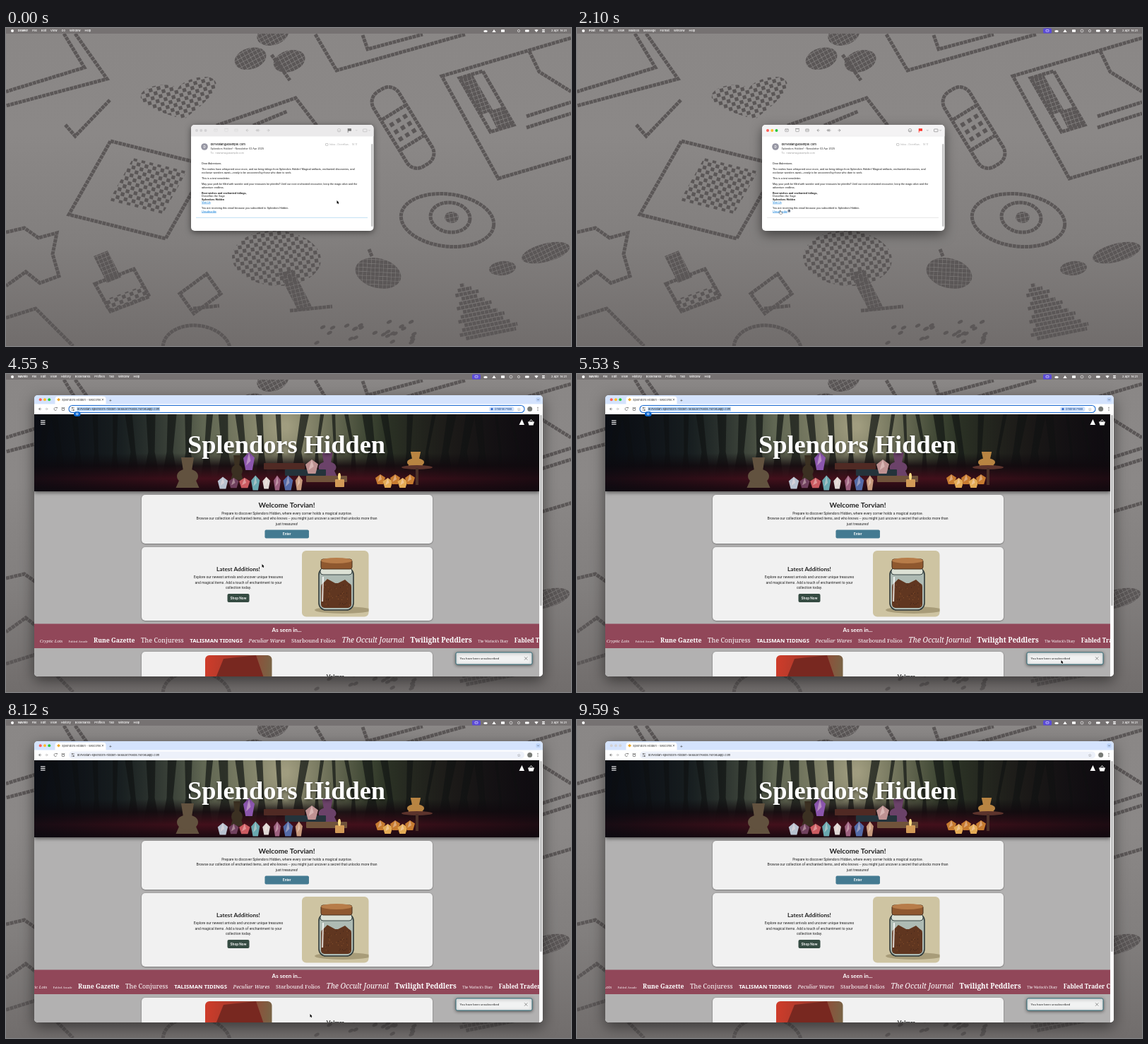
An HTML page with a canvas for the animation above (9.66 s loop, 800x450 px).

```html
<!DOCTYPE html>
<html lang="en">
<head>
<meta charset="utf-8">
<title>Unsubscribe demo</title>
<style>
html, body { margin: 0; width: 100%; height: 100%; overflow: hidden; background: #807c7b; }
canvas { display: block; }
</style>
</head>
<body>
<canvas id="stage" width="800" height="450"></canvas>
<script>
const LOOP = 9660, STEP = 70;
const RECORD = 350, ACTIVE = 700, HOVER = 1820, BROWSER = 2800, LOADED = 4480, BLUR = 6500, END = 9450;
const SHOP = 'Splendors Hidden';
const HOST = 'dorvellian-splendors-hidden-568a3e176ede.herokuapp.com';
const UI = 'Inter, sans-serif', BODY = 'Roboto, sans-serif', HEAD = 'Lato, sans-serif';
const ARIAL = '"Liberation Sans", Arial, sans-serif', SANS = '"Noto Sans", sans-serif';
const SERIF = '"Noto Serif", serif', NARROW = '"Liberation Serif", serif';
const stage = document.getElementById('stage').getContext('2d');
let c = stage;

function text(s, x, y, font, color = '#111', align = 'left') {
  c.font = font; c.fillStyle = color; c.textAlign = align;
  c.fillText(s, x, y);
  return c.measureText(s).width;
}
function paint(fill, stroke, width = 0.6) {
  if (fill) { c.fillStyle = fill; c.fill(); }
  if (stroke) { c.strokeStyle = stroke; c.lineWidth = width; c.stroke(); }
}
function box(x, y, w, h, r, fill, stroke, width) {
  c.beginPath(); c.roundRect(x, y, w, h, r); paint(fill, stroke, width);
}
function trace(points, closed) {
  c.beginPath();
  for (let i = 0; i < points.length; i += 2) c.lineTo(points[i], points[i + 1]);
  if (closed) c.closePath();
}
function line(points, color, width) { trace(points); paint(null, color, width); }
function poly(points, color) { trace(points, true); paint(color); }
function oval(x, y, rx, ry, color, angle = 0) {
  c.beginPath(); c.ellipse(x, y, rx, ry, angle, 0, 7); paint(color);
}
function dot(x, y, r, color) { oval(x, y, r, r, color); }
function arc(x, y, r, color, from = 0, to = 7) {
  c.beginPath(); c.arc(x, y, r, from, to); paint(null, color);
}
function cross(x, y, r, color) {
  line([x - r, y - r, x + r, y + r], color); line([x + r, y - r, x - r, y + r], color);
}
function chevron(x, y, r, color) { line([x - r, y - r / 2, x, y + r / 2, x + r, y - r / 2], color); }
function arrow(x, y, dir, color) {
  line([x, y - 2, x + 2 * dir, y, x, y + 2], color); line([x + 2 * dir, y, x - 1.5 * dir, y], color);
}
function gradient(x0, y0, x1, y1, ...colors) {
  const g = c.createLinearGradient(x0, y0, x1, y1);
  colors.forEach((color, i) => g.addColorStop(i / (colors.length - 1), color));
  return g;
}
function shadowed(blur, dy, draw) {
  c.save();
  c.shadowColor = 'rgba(0,0,0,.5)'; c.shadowBlur = blur; c.shadowOffsetY = dy;
  draw();
  c.restore();
}
function cached(draw) {
  const layer = document.createElement('canvas');
  layer.width = 800; layer.height = 450;
  c = layer.getContext('2d');
  draw();
  c = stage;
  return layer;
}
let seed = 7;
const random = () => (seed = seed * 16807 % 2147483647) / 2147483647;
const range = (n, f) => Array.from({ length: n }, (_, i) => f(i));

// Wallpaper: doodles laid out of small dark tiles
const TILE = '#5b5757';
function tiled() {
  c.setLineDash([5, 0.8]); paint(null, TILE, 5); c.setLineDash([]);
}
function row(...points) { trace(points); tiled(); }
function ring(x, y, rx, ry) {
  c.beginPath(); c.ellipse(x, y, rx, ry, .12, 0, 7); tiled();
}
// Corner and two edge vectors
const corners = (x, y, ax, ay, bx, by) => [x, y, x + ax, y + ay, x + ax + bx, y + ay + by, x + bx, y + by];
function frame(...quad) { trace(corners(...quad), true); tiled(); }
function mosaic(angle, checker) {
  c.save();
  c.clip(); c.rotate(angle);
  c.fillStyle = TILE;
  for (let i = -90; i < 170; i++) for (let j = -90; j < 130; j++)
    if (!checker || (i + j) % 2) c.fillRect(i * 5.8, j * 5.8, 5.2, 5.2);
  c.restore();
}
function slab(checker, ...quad) { trace(corners(...quad), true); mosaic(Math.atan2(quad[3], quad[2]), checker); }
function blob(x, y, rx, ry, tilt = 0, checker = false) {
  c.beginPath(); c.ellipse(x, y, rx, ry, tilt, 0, 7); mosaic(tilt - .2, checker);
}
function heart(x, y) {
  const m = new DOMMatrix().translate(x, y).rotate(-11).scale(3.4, 2.05);
  trace(range(40, i => {
    const a = i * Math.PI / 20;
    const p = m.transformPoint({ x: 16 * Math.sin(a) ** 3, y: 5 * Math.cos(2 * a) - 13 * Math.cos(a) + 2 * Math.cos(3 * a) });
    return [p.x, p.y];
  }).flat(), true);
  mosaic(-.25, true);
}
function bandage(x, y) {
  c.save();
  c.translate(x, y); c.rotate(-.55);
  c.beginPath(); c.roundRect(-21, -62, 42, 124, 17); tiled();
  for (const side of [-25, 25]) row(-19, side, 19, side);
  c.fillStyle = TILE;
  for (let i = 0; i < 9; i++) c.fillRect(i % 3 * 11 - 14, (i / 3 | 0) * 12 - 15, 6, 6);
  c.restore();
}
function pine(x, y) {
  for (let i = 0; i < 13; i++) {
    const cx = x + i * 3.4, cy = y + i * 5.7, w = 3 + i * 2.7 + i % 3 * 4;
    row(cx - w, cy + w * .2, cx + w, cy - w * .2);
  }
}

const wallpaper = cached(() => {
  c.fillStyle = gradient(0, 0, 0, 450, '#8a8786', '#8b8887', '#827f7e', '#716d6c');
  c.fillRect(0, 0, 800, 450);
  row(98, 8, 143, 72, 0, 110);
  row(82, 8, 111, 56, 0, 90);
  row(84, 137, 98, 153, 147, 102);
  heart(246, 98);
  for (let i = 0; i < 3; i++) blob(375 + 32 * Math.cos(i * 2.1 + 2.7), 33 + 24 * Math.sin(i * 2.1 + 2.7), 23, 15, -.3);
  row(376, 38, 402, 74);
  row(438, 9, 468, 60, 650, 9);
  row(505, 10, 512, 30, 590, 9);
  bandage(562, 141);
  frame(617, 68, 190, -56, 80, 145);
  row(741, 33, 755, 62, 800, 90);
  frame(642, 71, 33, -10, 44, 76);
  slab(false, 642, 71, 18, -6, 30, 52);
  slab(false, 683, 118, 22, -7, 13, 26);
  for (const y of [125, 141]) row(737, y, 800, y - 20);
  frame(148, 160, 137, 34, -59, 104);
  slab(true, 180, 184, 76, 19, -34, 60);
  row(298, 138, 410, 99, 440, 138); row(350, 138, 398, 118);
  ring(625, 272, 66, 37); ring(629, 268, 28, 21); blob(631, 268, 10, 8);
  row(0, 289, 26, 283, 46, 297, 72, 290, 66, 320, 75, 351, 48, 361, 28, 345, 0, 365);
  frame(126, 362, 55, -21, 22, 39);
  slab(false, 124, 323, 20, -8, 19, 38);
  slab(true, 136, 386, 60, -22, 8, 14);
  frame(246, 376, 38, -28, 20, 28); row(265, 397, 302, 393);
  blob(383, 326, 63, 39, .05, true);
  slab(false, 386, 347, 20, -5, 28, 54); row(402, 400, 462, 394);
  blob(527, 347, 33, 21, .25); row(518, 323, 514, 313);
  blob(764, 318, 35, 13, -.25);
  blob(703, 340, 19, 10, -.1);
  pine(646, 364);
  row(0, 410, 42, 397, 95, 450);
  ring(270, 455, 48, 34);
  for (let i = 0; i < 26; i++) oval(440 + random() * 147, 414 + random() * 34, 4, 2.2, TILE, -.5);
});

const MENUS = {
  desk: 'Drawer File Edit View Go Window Help',
  post: 'Post File Edit View Mailbox Message Format Window Help',
  web: 'Navvio File Edit View History Bookmarks Profiles Tab Window Help'
};
function menuBar(t) {
  c.fillStyle = '#767272'; c.fillRect(0, 0, 800, 8);
  dot(9, 4, 2, '#fff');
  let x = 17;
  if (t < END) MENUS[t >= BROWSER ? 'web' : t >= ACTIVE ? 'post' : 'desk'].split(' ').forEach((label, i) =>
    x += text(label, x, 5.4, (i ? 500 : 700) + ' 4px ' + UI, '#fff') + 6);
  if (t >= RECORD) {
    box(660, .4, 12, 7.2, 1.5, '#5a4ad8'); box(664, 2.5, 4, 2.6, .4, null, '#fff');
    arc(715, 4, 1.9, '#fff');
  }
  oval(679, 4.4, 2.8, 1.5, '#fff');
  poly([691, 2, 693.7, 6, 688.3, 6], '#fff');
  box(701, 2.3, 5, 3.5, .5, '#fff');
  arc(726, 4, 1.6, '#fff');
  box(735, 2.4, 5.6, 3.2, .8, '#fff');
  poly([748.2, 2.8, 751, 1.9, 753.8, 2.8, 751, 6], '#fff');
  for (const y of [2, 4.4]) box(759, y, 4, 1.5, .7, '#fff');
  text('2 Apr  16:21', 794, 5.4, '500 4px ' + UI, '#fff', 'right');
}
function lights(x, y, on) {
  ['#fe5f57', '#febc2e', '#28c840'].forEach((color, i) => dot(x + i * 6.25, y, 2, on ? color : '#d3d2d4'));
}

const LETTER = [
  'Dear Adventurer,', '',
  `The realms have whispered once more, and we bring tidings from ${SHOP}! Magical artifacts, enchanted discoveries, and`,
  'exclusive wonders await—ready to be uncovered by those who dare to seek.', '',
  'This is a test newsletter.', '',
  'May your path be filled with wonder and your treasures be plentiful! Until our next enchanted encounter, keep the magic alive and the',
  'adventure endless.', '',
  '*Best wishes and enchanted tidings,', 'Dorvellian the Sage', '*' + SHOP, '_Visit Us', '',
  `You are receiving this email because you subscribed to ${SHOP}.`, '_Unsubscribe'
];
// Leading * is bold, leading _ is a link
function letter() {
  let y = 193.2;
  for (const s of LETTER) {
    const link = s[0] === '_', bold = s[0] === '*';
    const width = text(s.replace(/^[*_]/, ''), 277, y, (bold ? 'bold ' : '') + '3.75px ' + ARIAL, link ? '#087bd8' : '#111');
    if (link) line([277, y + .6, 277 + width, y + .6], '#087bd8', .5);
    y += s ? 4.4 : 3.85;
  }
}
function messageWindow(t) {
  const on = t >= ACTIVE, ink = on ? '#777' : '#b5b5b5', faint = on ? '#777' : '#d6d6d6';
  shadowed(on ? 16 : 9, on ? 5 : 2, () => box(262, 137, 258.5, 150, 5, '#fff'));
  box(262, 137, 258.5, 16, [5, 5, 0, 0], on ? '#f4f3f4' : '#ebeaeb');
  lights(270, 145, on);
  for (const x of [297, 312, 326]) box(x - 2.3, 142.8, 4.6, 3.8, .6, null, faint, .5);
  chevron(297, 144, 1.8, faint);
  line([309, 142.4, 315, 142.4], faint); line([324, 144.4, 328, 144.4], faint);
  for (const x of [342, 356, 358]) arrow(x, 144.8, -1, ink);
  arrow(371, 144.8, 1, ink);
  arc(471.5, 144.8, 2.3, ink); arc(471.5, 144.8, 1.2, ink, 0, Math.PI);
  line([484.2, 142.2, 484.2, 148], on ? '#ff3b30' : '#777', .8);
  box(484, 142.2, 5, 3.5, .5, on ? '#ff3128' : '#777');
  box(505.5, 143, 5.5, 3.8, .7, null, ink);
  for (const x of [496.3, 514.5]) chevron(x, 144.8, 1, ink);
  line([262, 153.2, 520.5, 153.2], '#e2e2e2', .5);
  dot(281, 168, 4.8, '#9696a3');
  text('D', 281, 169.6, '600 4.4px ' + UI, '#fff', 'center');
  text('dorvellian@example.com', 289.5, 166.4, '500 4.1px ' + UI);
  text(SHOP + '! - Newsletter 02 Apr 2025', 289.5, 172, '3.6px ' + UI, '#333');
  text('To:  newtarra@example.com', 289.5, 178, '3.5px ' + UI, '#999');
  box(452.5, 163.5, 3.5, 2.8, .4, null, '#999', .5);
  text('Inbox - Dorvellian...   16:17', 458, 166.3, '3.2px ' + UI, '#aaa');
  letter();
  if (t >= HOVER) { box(298.6, 257, 3.4, 3.6, .7, '#53647a'); chevron(300.3, 258.8, .9, '#fff'); }
  line([269, 268.4, 512, 268.4], on ? '#dedede' : '#a9d4ee', .7);
  box(517.3, 164, 2, 117, 1, '#bbb');
}

function browserFrame(t) {
  const loaded = t >= LOADED, focused = t < BLUR, ink = '#444';
  shadowed(20, 6, () => box(40, 30, 720, 398, 5, '#fff'));
  box(40, 30, 720, 12.5, [5, 5, 0, 0], '#d4e3fd');
  lights(48.7, 36.2, t < END);
  box(69.5, 31.8, 72, 11, [4, 4, 0, 0], '#fff');
  if (loaded) poly([74.5, 34, 77, 36.2, 74.5, 38.5, 72, 36.2], '#eda82e');
  else arc(75, 36.2, 1.7, '#777', t / 150, t / 150 + 1.8);
  text(loaded ? SHOP + ' - Welcome' : 'Untitled', 79, 37.7, '4px ' + UI, '#333');
  cross(136.8, 36.2, 1.2, ink);
  text('+', 148, 38.5, '6.5px ' + UI, ink, 'center');
  box(750.5, 33.3, 6, 6, 1.8, '#bcd3f8');
  chevron(753.5, 36.3, 1.2, ink);
  arrow(48.5, 49.5, -1, loaded ? ink : '#aaa');
  arrow(57, 49.5, 1, '#aaa');
  if (loaded) { arc(70, 49.5, 2, ink, .4, 5.6); poly([71, 47, 72.6, 47, 72.6, 49], ink); }
  else cross(70, 49.5, 1.8, ink);
  box(79.2, 48, 3.4, 3.5, .4, null, ink); chevron(80.9, 48, 2.2, ink);
  box(89, 44.5, 645, 10, 5, focused ? '#fff' : '#edf1fa', focused && '#1668d0', 1.1);
  if (loaded) for (const i of [0, 1]) {
    line([92.5, 48 + i * 3, 97, 48 + i * 3], ink); dot(94 + i * 1.7, 48 + i * 3, .8, ink);
  } else arc(95, 49.5, 2, ink);
  const font = '4.1px ' + UI;
  if (loaded && focused) {
    c.font = font;
    box(100.3, 46.6, c.measureText(HOST).width + 1, 6, 0, '#b5d5fa');
  }
  text(loaded ? HOST : HOST + '/support/unsubscribe/61/nRvLRN0eXVKYUbMWFobCSj82DiZ-YU_x-i/89C1SDgjQuIAleH5zG1EDjBV5-mQ/', 100.8, 51, font, '#222');
  if (focused) {
    box(684, 46, 35.5, 7.2, 3.6, '#d3e3fd');
    dot(688, 49.6, 1.7, '#2d64c3');
    text('Ombrek Peek', 691.5, 51, '500 3.9px ' + UI, '#174a91');
  }
  text('☆', 726.3, 51.7, '6px "DejaVu Sans", sans-serif', ink, 'center');
  dot(741.7, 49.5, 3.5, '#777a76');
  for (let i = 0; i < 3; i++) dot(753, 47.4 + i * 2.1, .6, ink);
}
function focusBadge() {
  box(96, 53.2, 9.5, 6.8, 3.2, '#0a66d0');
  dot(100.7, 56.5, 1.7, '#fff'); dot(100.7, 56.5, .9, '#0a66d0');
}

function gem(x, y, w, h, color) {
  poly([x, y - h, x + w, y - h * .35, x + w * .6, y + h, x - w * .6, y + h, x - w, y - h * .3], color);
  poly([x, y - h, x + w * .3, y, x - w * .5, y + h * .5], 'rgba(255,235,230,.4)');
}
function vessel(x, y, w, h, color) {
  poly([x - w * .3, y, x + w * .3, y, x + w * .2, y + h * .45, x + w * .55, y + h, x - w * .55, y + h, x - w * .2, y + h * .45], color);
  oval(x, y + h * .62, w * .5, h * .24, color);
}
function heroArt() {
  c.save();
  c.beginPath(); c.rect(40, 57, 715, 109); c.clip();
  const wash = fill => { c.fillStyle = fill; c.fillRect(40, 57, 715, 109); };
  wash(gradient(40, 0, 755, 0, '#10151c', '#202a2a', '#59604e', '#626450', '#303929', '#24221d', '#131015'));
  const glow = c.createRadialGradient(395, 74, 5, 395, 74, 150);
  glow.addColorStop(0, 'rgba(194,187,153,.65)'); glow.addColorStop(1, 'rgba(120,125,95,0)');
  wash(glow);
  for (let x = 50; x < 755; x += 26) {
    const w = 2 + random() * 5, lean = (random() - .5) * 24;
    poly([x - w + lean, 57, x + w + lean, 57, x + w * .7, 110, x + w * 1.8, 148, x - w * 1.8, 148, x - w * .7, 110], 'rgba(20,24,22,.72)');
  }
  wash(gradient(0, 112, 0, 166, 'rgba(16,12,15,0)', 'rgba(22,11,15,.9)', '#42101b', '#190910'));
  wash(gradient(40, 0, 755, 0, 'rgba(8,10,16,.75)', 'rgba(8,8,12,0)', 'rgba(8,8,12,0)', 'rgba(13,9,14,.7)'));
  vessel(257, 118, 30, 43, '#62523f');
  vessel(327, 115, 16, 35, '#3b3022');
  vessel(455, 111, 25, 34, '#6b4269');
  vessel(580, 110, 24, 24, '#b88442');
  oval(582, 132, 22, 3, '#5c332c'); line([582, 133, 582, 157], '#4c3028', 4);
  ['#502a24', '#24333b', '#70533b'].forEach((color, i) => box(365 + i * 30, 126 + i * 9, 58, 9, 1, color));
  gem(344, 123, 8, 13, '#8b56ad');
  gem(433, 131, 9, 10, '#be9292');
  ['#b8c2d0', '#70415e', '#cb5b61', '#69a8af', '#e0d9d6', '#9c607f', '#536aa7', '#c89a7d'].forEach((color, i) =>
    gem(307 + i * 15.4, 154, 5 + random() * 3, 6 + random() * 5, color));
  for (let i = 0; i < 5; i++) gem(530 + i * 10.5, 149 + i % 2 * 5, 7, 7, i % 2 ? '#e4ab55' : '#c77b30');
  box(466, 149, 13, 11, 1, '#d29a57'); oval(472, 145, 2, 5, '#ffdd86');
  c.restore();
}
function jar() {
  c.save();
  box(419, 250, 94.5, 93.5, 6, '#cec4a2'); c.clip();
  oval(477, 334, 40, 5, '#a89c79');
  box(443, 274, 49, 60, 10, '#aebbb4', '#303a3a', 1.6);
  box(446, 296, 43, 35, 5, '#603620'); poly([446, 299, 455, 290, 468, 297, 480, 291, 489, 299], '#603620');
  for (let i = 0; i < 50; i++) dot(449 + random() * 38, 298 + random() * 30, .6, i % 2 ? '#87502b' : '#3e2419');
  box(445, 275, 45, 9, 4, '#dce1d5', '#394544', 1);
  line([449, 287, 448, 322], 'rgba(255,255,255,.75)', 2.2);
  box(446, 262, 44, 14, 3, '#8f582f', '#49301f', 1);
  oval(468, 264, 22, 4, '#b77c49');
  c.restore();
}
function button(label, x, y, w, color) {
  box(x - w / 2, y, w, 12, 2, color);
  text(label, x, y + 7.8, '500 5px ' + BODY, '#fff', 'center');
}
function copy(title, size, x, y, ...lines) {
  text(title, x, y, `bold ${size}px ${HEAD}`, '#222', 'center');
  lines.forEach((s, i) => text(s, x, y + 10 + i * 7.5, '5px ' + BODY, '#222', 'center'));
}
const page = cached(() => {
  c.beginPath(); c.rect(40, 57, 720, 371); c.clip();
  c.fillStyle = '#b2b1b1'; c.fillRect(40, 57, 715, 371);
  shadowed(5, 2, () => box(40, 57, 715, 109, 0, '#151416'));
  heroArt();
  for (let i = 0; i < 3; i++) line([49, 66 + i * 2.5, 55.5, 66 + i * 2.5], '#fff', 1.1);
  poly([730.5, 64, 734, 72, 726.5, 72], '#fff');
  poly([739, 67.5, 748, 67.5, 746.5, 72.5, 740.5, 72.5], '#fff');
  line([741, 67.5, 743.5, 64.5, 746, 67.5], '#fff', .9);
  shadowed(4, 2, () => text(SHOP, 397, 112, 'bold 36.4px ' + NARROW, '#fff', 'center'));
  for (const [y, h] of [[171, 69], [245, 104], [393, 50]])
    shadowed(2, .5, () => box(192, y, 412, h, 5, '#f1f1f1'));
  copy('Welcome Torvian!', 10, 397.5, 188.5,
    `Prepare to discover ${SHOP}, where every corner holds a magical surprise.`,
    'Browse our collection of enchanted items, and who knows -- you might just uncover a secret that unlocks more than',
    'just treasures!');
  button('Enter', 397.7, 220.5, 62.5, '#447a91');
  copy('Latest Additions!', 8.2, 329, 279,
    'Explore our newest arrivals and uncover unique treasures',
    'and magical items. Add a touch of enchantment to your',
    'collection today.');
  button('Shop Now', 329, 311, 31, '#354b42');
  jar();
  box(40, 353.5, 715, 34.5, 0, '#914759');
  text('As seen in...', 397.5, 365, 'bold 8px ' + HEAD, '#fff', 'center');
  box(282, 398, 94.5, 50, 6, gradient(282, 398, 376, 410, '#d03c2a', '#a33a2d', '#796345'));
  poly([308, 403, 354, 398, 365, 430, 297, 430], '#782820');
  copy('Velmra', 8.2, 466.5, 431);
  c.fillStyle = '#fafafa'; c.fillRect(755, 57, 5, 371);
  box(756.2, 58, 2.6, 270, 1.3, '#b9b9b9');
});

const PRESS = [
  ['Cryptic Lots', 'italic 6.5px ' + NARROW], ['Fabled Arcade', '4.6px ' + NARROW],
  ['Rune Gazette', '600 8.7px ' + SERIF], ['The Conjuress', '9px ' + SERIF],
  ['TALISMAN TIDINGS', '800 7.8px ' + SANS], ['Peculiar Wares', 'italic 7.3px ' + SERIF],
  ['Starbound Folios', '7.8px ' + SERIF], ['The Occult Journal', 'italic 10.2px ' + SERIF],
  ['Twilight Peddlers', '600 9.8px ' + SERIF], ["The Warlock's Diary", '5.2px ' + NARROW],
  ['Fabled Trader Cove', '600 8.2px ' + SERIF]
];
function marquee(t) {
  let x = 75.7 - t * .00616;
  c.save();
  c.beginPath(); c.rect(40, 366, 715, 22); c.clip();
  for (const [name, font] of PRESS) x += text(name, x, 380, font, '#fff') + 8.6;
  c.restore();
}
function toast() {
  shadowed(4, 1, () => box(637, 394, 108, 17, 2, '#f1f2f2', '#37727f', 1));
  text('You have been unsubscribed', 642.5, 404, '4.4px ' + BODY, '#222');
  cross(736.2, 402.5, 2.2, '#555');
}

// Arrival time and place; each glide takes GLIDE ms
const GLIDE = 700;
const STOPS = [[1850, 288, 260], [3500, 363, 271], [5400, 686, 407], [6850, 717, 404], [8000, 431, 418], [9450, 431, 456]];
function pointer(t) {
  let x = 469, y = 246;
  for (const [time, toX, toY] of STOPS) {
    const u = Math.min(1, Math.max(0, 1 + (t - time) / GLIDE)), e = u * u * (3 - 2 * u);
    x += (toX - x) * e; y += (toY - y) * e;
  }
  const hand = t >= HOVER && t < BROWSER;
  c.save();
  c.translate(x, y);
  c.lineJoin = 'round';
  trace(hand ? [-.6, -1.5, .3, -1.5, .3, .5, 2.3, 1, 2, 3.4, -.6, 3.4, -2, 1.2, -.6, 1.4]
    : [-.5, -2, -.5, 2.6, .5, 1.7, 1.2, 3.2, 2, 2.8, 1.3, 1.4, 2.6, 1.3], true);
  paint(null, hand ? '#111' : '#fff', .7);
  paint(hand ? '#fff' : '#000');
  c.restore();
}

function draw(now) {
  const t = Math.floor(now % LOOP / STEP) * STEP;
  c.drawImage(wallpaper, 0, 0);
  menuBar(t);
  if (t < BROWSER) messageWindow(t);
  else browserFrame(t);
  if (t >= LOADED) {
    c.save();
    c.beginPath(); c.roundRect(40, 30, 720, 398, 5); c.clip();
    c.drawImage(page, 0, 0);
    marquee(t);
    toast();
    c.restore();
  }
  if (t >= BROWSER && t < BLUR) focusBadge();
  pointer(t);
}
const start = performance.now();
function tick() {
  draw(performance.now() - start);
  requestAnimationFrame(tick);
}
tick();
</script>
</body>
</html>
```
